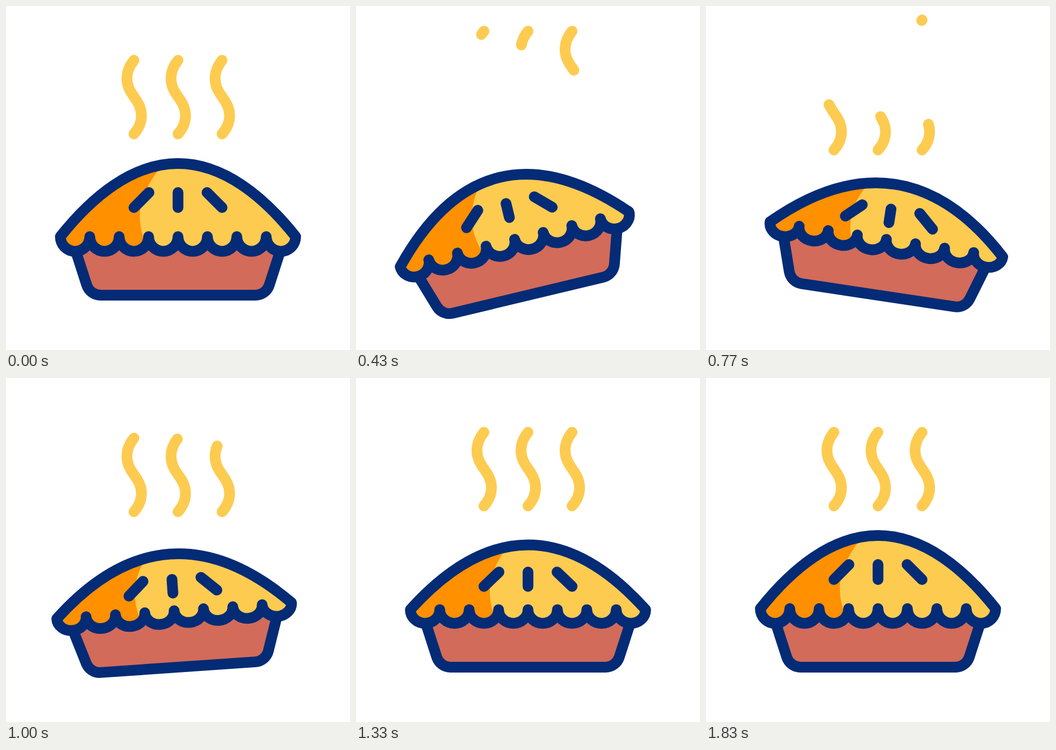
Write an HTML page that moves like this. It is 640 px wide and 640 px high and loops after 2 s.

```html
<!DOCTYPE html>
<html lang="en">
<head>
<meta charset="utf-8">
<title>Steaming pie</title>
<style>
  html, body { margin: 0; width: 100%; height: 100%; overflow: hidden; background: #fff; }
  svg { display: block; width: 100%; height: 100%; }
  .line { fill: none; stroke: #042b75; stroke-width: 20; stroke-linejoin: round; }
  .steam { fill: none; stroke: #fdcb50; stroke-width: 20; stroke-linecap: round; }
</style>
</head>
<body>
<svg viewBox="0 0 640 640">
  <defs><clipPath id="inside"><path class="crust"/></clipPath></defs>
  <g id="steam"></g>
  <g id="pie">
    <path class="line" style="fill:#d26b5a"
      d="M128.5 452L150.3 519.5A27 27 0 0 0 176 538H464A27 27 0 0 0 489.7 519.5L511.5 452"/>
    <path class="crust" fill="#fdcb50"/>
    <g clip-path="url(#inside)">
      <path id="shade" fill="#ff9000"
        d="M80 240H320L303 280C268 322 249 355 249 390C249 410 253 425 260 445V470H80Z"/>
    </g>
    <path class="crust line"/>
    <path id="slits" class="line" stroke-linecap="round"/>
  </g>
</svg>
<script>
const LOOP = 2000, FPS = 30;
const SPACING = 82;
const WISP = 'M238 101C229 112 225 123 225 135C225 149 231 159 238.5 169.5S252 190 252 204C252 216 247 228 238 238';

const pie = document.getElementById('pie');
const shade = document.getElementById('shade');
const slits = document.getElementById('slits');
const crusts = document.querySelectorAll('.crust');
const steam = document.getElementById('steam');

const ramp = (t, a, b) => Math.min(1, Math.max(0, (t - a) / (b - a)));
const ease = (t, a, b) => { const u = ramp(t, a, b); return u * u * (3 - 2 * u); };

// Eased track through [time, value] keys.
function track(t, keys) {
  return keys.slice(1).reduce((value, [time, next], i) =>
    value + (next - keys[i][1]) * ease(t, keys[i][0], time), keys[0][1]);
}

function makeWisp() {
  const path = document.createElementNS('http://www.w3.org/2000/svg', 'path');
  path.setAttribute('d', WISP);
  path.setAttribute('pathLength', 1);
  path.setAttribute('class', 'steam');
  return steam.appendChild(path);
}

const wisps = [
  { leave: [30, 497], arrive: [533, 933] },
  { leave: [108, 560], arrive: [533, 1033] },
  { leave: [92, 805], arrive: [533, 1125] }
].map(w => ({ ...w, oldPath: makeWisp(), newPath: makeWisp() }));

function showPart(path, from, to, x, y) {
  path.style.display = to - from > 0.001 ? '' : 'none';
  path.setAttribute('stroke-dasharray', `${to - from} 2`);
  path.setAttribute('stroke-dashoffset', -from);
  path.setAttribute('transform', `translate(${x} ${y})`);
}

function crustPath(sink) {
  const rim = 429 + 0.11 * sink, top = 293 + sink, side = 355 + 0.6 * sink;
  const r = 27.36;
  const scallop = `a${r} ${456.4 - rim} 0 0 1 ${-2 * r} 0`;
  return `M${320 - 8 * r} ${rim}C160 ${side} 235 ${top} 320 ${top}` +
    `S480 ${side} ${320 + 8 * r} ${rim}` + scallop.repeat(8) + 'Z';
}

function slitPath(sink) {
  const y1 = 347 + 0.8 * sink, y2 = 375 + 0.73 * sink;
  return `M266 ${y1}L238 ${y2}M320 ${y1}V${y2}M374 ${y1}L402 ${y2}`;
}

function draw(t) {
  const sink = track(t, [[0, 0], [833, 37], [1800, 0]]);
  const angle = track(t, [[107, 0], [500, -14.6], [800, 9.4], [1040, -5], [1300, 0]]);
  const d = crustPath(sink);
  crusts.forEach(c => c.setAttribute('d', d));
  shade.setAttribute('transform', `translate(0 ${0.35 * sink})`);
  slits.setAttribute('d', slitPath(sink));
  pie.setAttribute('transform', `rotate(${angle} 320 538)`);

  const rise = -75 * ramp(t, 0, 600);
  const approach = 49 * (1 - ramp(t, 533, 1133));
  wisps.forEach((w, i) => {
    showPart(w.oldPath, 0, 1 - ease(t, ...w.leave), i * SPACING, rise);
    showPart(w.newPath, 1 - ease(t, ...w.arrive), 1, i * SPACING, approach);
  });
}

const start = performance.now();
function tick() {
  const t = (performance.now() - start) % LOOP;
  draw(Math.floor(t * FPS / 1000 + 0.2) * 1000 / FPS % LOOP);
  requestAnimationFrame(tick);
}
tick();
</script>
</body>
</html>
```
